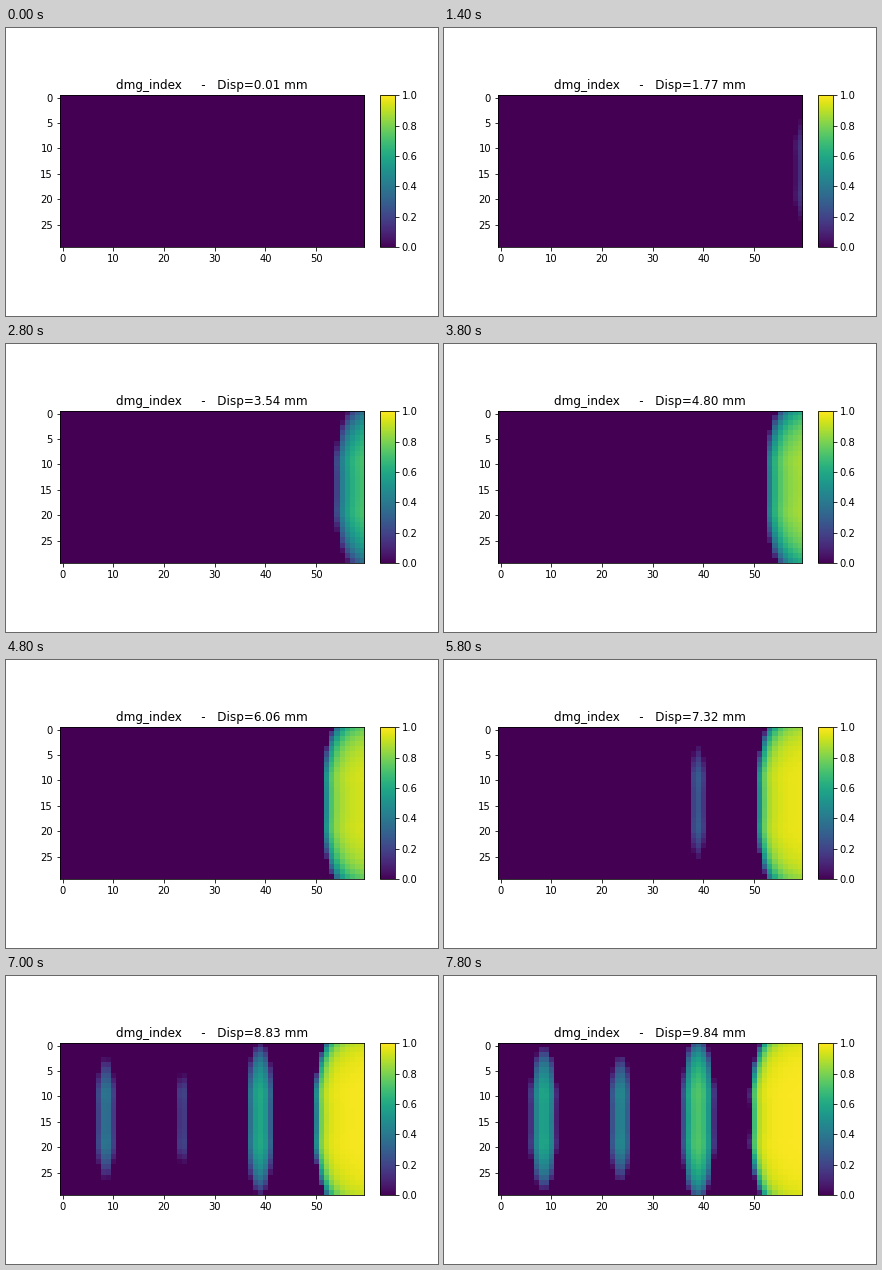
A matplotlib script that plays this animation: 432 by 288 pixels, repeating every 8 s.

```python
import numpy as np
import matplotlib.pyplot as plt
from matplotlib.animation import FuncAnimation
from mpl_toolkits.axes_grid1 import make_axes_locatable

ROWS, COLS = 30, 60
FRAMES, INTERVAL = 40, 200
DISP_START, DISP_END = 0.01, 9.84
BANDS = [(8.45, 7.6), (23.6, 8.3), (38.9, 6.5)]  # centre column, first failure

cols = np.arange(COLS)
mid = (ROWS - 1) / 2
s = np.abs(np.arange(ROWS) - mid)[:, None] / mid

# Strain falls off towards the top and bottom edges, with a slight peak off centre
falloff = s**3.5 - 0.06 * np.exp(-((s - 0.36) / 0.13) ** 2)

# Displacement at which each column starts to fail
depth = COLS - 1 - cols
end_onset = 1.54 + 0.16 * depth + 0.0067 * depth**3
band_onset = np.min([first + 0.31 * (cols - centre) ** 2
                     for centre, first in BANDS], axis=0)


def grow(disp, onset, rate, drop):
    excess = disp / (1 + drop * falloff) - onset
    return 1 - np.exp(-rate * np.maximum(excess, 0))


def damage(disp):
    end = grow(disp, end_onset, rate=0.6, drop=0.53)
    bands = grow(disp, band_onset, rate=0.38, drop=0.3)
    return np.maximum(end, bands)


plt.rcParams.update({"font.family": "DejaVu Sans", "font.size": 10})
fig, ax = plt.subplots(figsize=(6, 4), dpi=72)
fig.subplots_adjust(left=0.125, right=0.9, bottom=0.125, top=0.88)
image = ax.imshow(damage(DISP_START), cmap="viridis", vmin=0, vmax=1,
                  interpolation="nearest")
ax.set_xticks(range(0, COLS, 10))
ax.set_yticks(range(0, ROWS, 5))
title = ax.set_title("", fontsize=12)
cax = make_axes_locatable(ax).append_axes("right", size="5%", pad="5%")
fig.colorbar(image, cax=cax, ticks=np.linspace(0, 1, 6))


def update(i):
    disp = DISP_START + (DISP_END - DISP_START) * i / (FRAMES - 1)
    image.set_data(damage(disp))
    title.set_text(f"dmg_index     -   Disp={disp:.2f} mm")
    return image, title


anim = FuncAnimation(fig, update, frames=FRAMES, interval=INTERVAL,
                     init_func=lambda: update(0), repeat=True)
plt.show()
```
